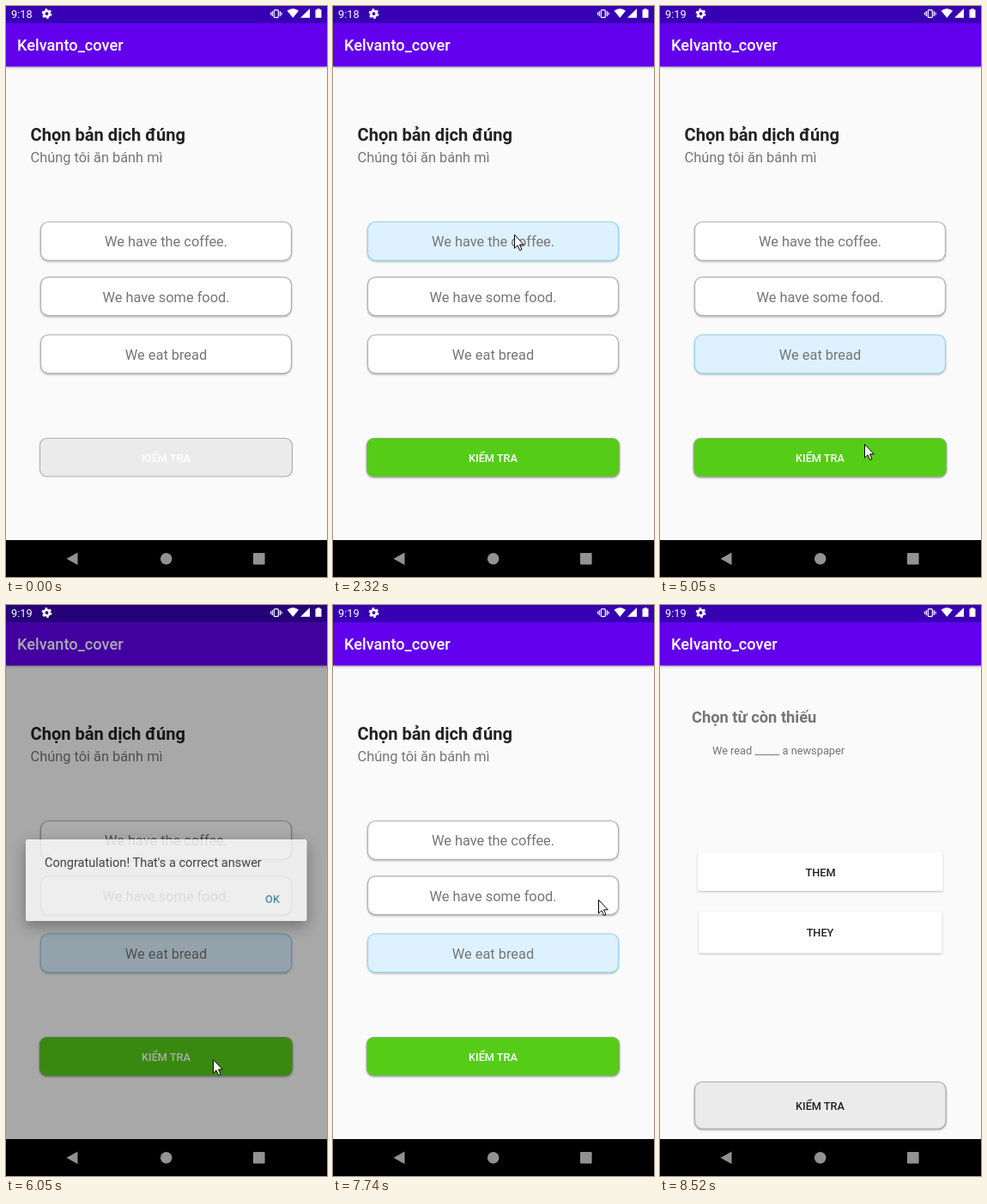
Recreate the animation shown at these times as an HTML page. Size 374 by 665 pixels, loop 8920 ms.

```html
<!DOCTYPE html>
<html lang="vi">
<head>
<meta charset="utf-8">
<title>Quiz</title>
<style>
html, body { margin: 0; width: 100%; height: 100%; overflow: hidden; background: #fafafa; }
svg { display: block; width: 374px; height: 665px; font-family: Roboto, "Noto Sans", sans-serif; }
.mid { text-anchor: middle; }
.title { font-size: 18.2px; font-weight: 500; fill: #fff; }
.body { font-size: 16.36px; fill: #757575; }
.label { font-size: 12.73px; font-weight: 500; text-anchor: middle; fill: #212121; }
.card { fill: #fff; stroke: #b1b1b1; stroke-width: 1.2; filter: drop-shadow(0 1px .8px rgba(0,0,0,.28)); }
.card.on { fill: #ddf2fe; stroke: #92d5f0; }
.check { fill: #ebebeb; stroke: #aeaeae; stroke-width: 1.2; }
.check.on { fill: #55cc18; stroke: #83b46b; filter: drop-shadow(0 1px 1px rgba(0,0,0,.4)); }
.check.pressed { filter: drop-shadow(0 2px 2px rgba(0,0,0,.45)); }
.flat { fill: #fff; filter: drop-shadow(0 1px 1px rgba(0,0,0,.25)); }
</style>
</head>
<body>
<svg viewBox="0 0 374 665">
  <defs>
    <g id="bars">
      <rect width="374" height="665" fill="#fafafa"/>
      <rect y="20" width="374" height="50.5" fill="#6200ee" style="filter:drop-shadow(0 1px 1.5px rgba(0,0,0,.35))"/>
      <rect width="374" height="20" fill="#3700b3"/>
    </g>
  </defs>

  <use href="#bars"/>
  <g id="first">
    <text class="title" x="13" y="52">Kelvanto_cover</text>
    <text x="28.5" y="157" font-size="20.1" font-weight="700" fill="#212121">Chọn bản dịch đúng</text>
    <text class="body" x="28.5" y="181.5">Chúng tôi ăn bánh mì</text>
    <g id="options"></g>
    <rect id="check" class="check" x="39.5" y="503.5" width="294" height="44.5" rx="8"/>
    <text id="checkText" class="label" x="186.5" y="531" style="fill:#fff">KIỂM TRA</text>
  </g>

  <g id="second">
    <use href="#bars"/>
    <g id="secondBody">
      <text class="title" x="13" y="52">Kelvanto_cover</text>
      <text x="37" y="137" font-size="18.3" font-weight="700" fill="#757575">Chọn từ còn thiếu</text>
      <text x="61" y="173.5" font-size="12.8" fill="#757575">We read _____ a newspaper</text>
      <rect class="flat" x="44" y="288" width="285.5" height="45" rx="1.5"/>
      <text class="label" x="187" y="315.5">THEM</text>
      <rect class="flat" x="45" y="357" width="283.5" height="48.5" rx="1.5"/>
      <text class="label" x="186.5" y="386">THEY</text>
      <rect class="check" x="40.5" y="555.5" width="292.5" height="54.5" rx="9" style="filter:drop-shadow(0 1px 1px rgba(0,0,0,.35))"/>
      <text class="label" x="186.5" y="587.5">KIỂM TRA</text>
    </g>
  </g>

  <rect id="dim" width="374" height="622"/>
  <g id="dialog">
    <rect x="23" y="273" width="327.5" height="95" rx="2" fill="#fff" style="filter:drop-shadow(0 6px 9px rgba(0,0,0,.4))"/>
    <text x="45" y="305" font-size="14.55" fill="#2b2b2b">Congratulation! That's a correct answer</text>
    <text id="ok" class="label" x="310.5" y="347">OK</text>
  </g>

  <g fill="#fff">
    <text id="clock" x="6" y="13.5" font-size="12.73"></text>
    <g transform="translate(47.5 9)">
      <circle r="3.2" fill="none" stroke="#fff" stroke-width="2.6"/>
      <circle r="4.9" fill="none" stroke="#fff" stroke-width="2" stroke-dasharray="2.6 2.53"/>
    </g>
    <g fill="none" stroke="#fff" stroke-width="1.2">
      <rect x="312.3" y="4.6" width="5" height="8.8" rx="1"/>
      <path d="M310.3 6v6M319.3 6v6M308.5 7.5v3M321.1 7.5v3"/>
    </g>
    <path d="M327.5 5.5Q334.3 .5 341 5.5L334.3 13.8Z"/>
    <path d="M354 3V13.8H343Z"/>
    <path d="M360.5 4.3h2v-1.3h3v1.3h2v9.5h-7z"/>
  </g>

  <rect y="622" width="374" height="43"/>
  <g fill="#929292">
    <path d="M83.5 636.5V651L70.5 643.8Z"/>
    <circle cx="186.7" cy="643.8" r="6.8"/>
    <rect x="288" y="637" width="13.6" height="13.6" rx="1"/>
  </g>
  <path id="cursor" d="M.5 .5V16.2L4 12.8L6.6 18.6L9 17.5L6.5 11.9H11.3Z" fill="#fff" stroke="#000"/>
</svg>
<script>
const LOOP = 8920;
const $ = id => document.getElementById(id);
const clamp = v => Math.min(1, Math.max(0, v));
const show = (el, visible) => el.setAttribute('display', visible ? 'inline' : 'none');

// Bursts of screen updates: start, end, number of updates.
const bursts = [
  [1550, 2400, 12], [2550, 3090, 8], [3240, 4120, 12], [4190, 4270, 2], [4670, 5210, 8],
  [5820, 5890, 2], [6050, 6130, 2], [6440, 7280, 12], [7510, 8370, 12], [8440, 8520, 2]
];

// Pointer positions: time, x, y.
const route = [
  [1550, 341, 330], [2170, 211, 266], [2550, 211, 266], [2820, 188, 308], [3090, 204, 338],
  [3320, 204, 338], [3660, 221, 398], [4120, 223, 409], [4600, 223, 409], [5210, 241, 529],
  [6380, 241, 529], [7280, 309, 343], [8050, 309, 343], [8370, 346, 630], [8440, 346, 650]
];

const answers = [['We have the coffee.', 251.5], ['We have some food.', 315.8], ['We eat bread', 383]];
$('options').innerHTML = answers.map(([text, y]) =>
  `<rect class="card" x="40.5" y="${y}" width="292" height="44.8" rx="9"/>
   <text class="body mid" x="186.5" y="${y + 28.7}">${text}</text>`).join('');
const cards = document.querySelectorAll('.card');

function stepped(t) {
  let held = 0;
  for (const [start, end, count] of bursts) {
    if (t < start) break;
    const step = (end - start) / (count - 1);
    held = Math.min(end, start + Math.floor((t - start + 5) / step) * step);
  }
  return held;
}

function pointer(t) {
  const i = route.findIndex(p => p[0] > t);
  if (i < 1) return route[route.length - 1].slice(1);
  const [a, b] = [route[i - 1], route[i]];
  const p = (t - a[0]) / (b[0] - a[0]);
  const e = p * p * (3 - 2 * p);
  return [1, 2].map(k => a[k] + (b[k] - a[k]) * e);
}

// Quick start with a very slow finish: two joined cubic curves.
function slide(x) {
  if (x <= 0) return 0;
  if (x >= 1) return 1;
  const c = x < 1 / 6
    ? [[0, .05, .133333, 1 / 6], [0, 0, .06, .4]]
    : [[1 / 6, .208333, .25, 1], [.4, .82, 1, 1]];
  const cubic = ([a, b, d, e], u) =>
    a * (1 - u) ** 3 + 3 * b * u * (1 - u) ** 2 + 3 * d * u * u * (1 - u) + e * u ** 3;
  let lo = 0, hi = 1;
  for (let i = 0; i < 24; i++) {
    const m = (lo + hi) / 2;
    if (cubic(c[0], m) < x) lo = m; else hi = m;
  }
  return cubic(c[1], lo);
}

function dialogState(t) {
  if (t < 6045 || t >= 7735) return [0, 0];
  if (t < 6125) return [.33, .8];
  return t < 7655 ? [.6, 1] : [.3, .35];
}

function render(time) {
  const t = stepped(time);
  const chosen = t < 2235 ? -1 : t < 3240 ? 0 : t < 4190 ? 1 : 2;
  cards.forEach((card, i) => card.classList.toggle('on', i === chosen));
  $('check').classList.toggle('on', chosen >= 0);
  $('check').classList.toggle('pressed', t >= 5820 && t < 5885);
  $('clock').textContent = t > 0 && t < 3240 || t === 0 ? '9:18' : '9:19';

  const [dim, alpha] = dialogState(t);
  $('dim').setAttribute('opacity', dim);
  $('dialog').setAttribute('opacity', alpha);
  $('ok').style.fill = t < 6125 ? '#2f87a0' : '#03dac5';

  const shift = slide((t - 7741) / 450);
  $('first').setAttribute('transform', `translate(${-37.4 * shift} 0)`);
  $('secondBody').setAttribute('transform', `translate(${37.4 * (1 - shift)} 0)`);
  $('second').setAttribute('opacity', clamp((t - 7825) / 60));

  show($('cursor'), t >= 1550 && t < 8515);
  const [x, y] = pointer(t);
  $('cursor').setAttribute('transform', `translate(${Math.round(x)} ${Math.round(y)})`);
}

const origin = performance.now();
function frame() {
  render((performance.now() - origin) % LOOP);
  requestAnimationFrame(frame);
}
render(0);
requestAnimationFrame(frame);
</script>
</body>
</html>
```
